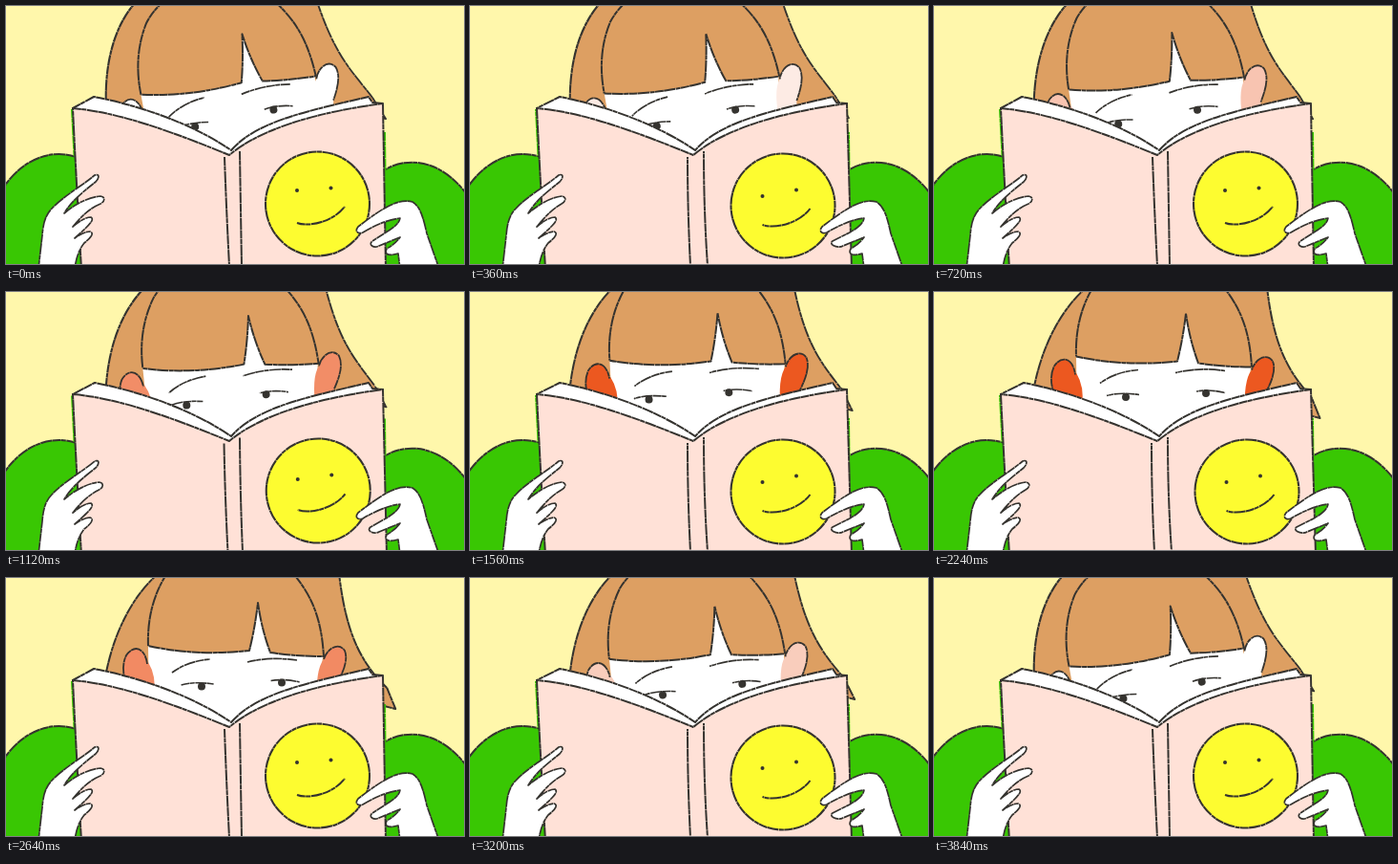
These frames come from a looping animation (480 px wide and 270 px high, 3880 ms). An HTML page with a canvas:

```html
<!DOCTYPE html>
<html lang="en">
<head>
<meta charset="utf-8">
<title>Reading</title>
<style>
html, body { margin: 0; width: 100%; height: 100%; overflow: hidden; background: #fff7ab; }
canvas { display: block; width: 480px; height: 270px; }
</style>
</head>
<body>
<canvas id="stage" width="480" height="270"></canvas>
<script>
const ctx = document.getElementById('stage').getContext('2d');
const LOOP = 3880;
const INK = '#35332f', PAPER = '#fff7ab', HAIR = '#dd9f62', GREEN = '#39c703', PINK = '#ffe1d7';

// Pose keys, interpolated smoothly around the loop
const times = [0, 720, 1560, 2240, 2640, 3200];
const keys = {
  x: [233, 233, 238.5, 241, 241, 238],
  y: [82.5, 80.5, 73, 72.5, 76, 81.5],
  angle: [-.165, -.13, -.04, 0, 0, -.09],
  shear: [-22, -17, -9, 0, 0, -9],
  tail: [118, 118, 124, 132, 137, 127],
  gaze: [-1.5, -5, -12.5, 0, 4, .5],
  blush: [0, .35, 1, 1, .7, .3]
};

function sample(values, t) {
  const n = times.length;
  const wrap = i => (i + n) % n;
  const timeAt = i => times[wrap(i)] + Math.floor(i / n) * LOOP;
  const slope = i => (values[wrap(i + 1)] - values[wrap(i - 1)]) / (timeAt(i + 1) - timeAt(i - 1));
  let i = n - 1;
  while (times[i] > t) i--;
  const span = timeAt(i + 1) - times[i], u = (t - times[i]) / span;
  const a = values[i], b = values[wrap(i + 1)];
  return a + (b - a) * u * u * (3 - 2 * u)
    + span * u * (1 - u) * (slope(i) * (1 - u) - slope(wrap(i + 1)) * u);
}

const fill = (path, color) => { ctx.fillStyle = color; ctx.fill(new Path2D(path)); };

function line(path, width = 2, color = INK) {
  ctx.lineWidth = width;
  ctx.strokeStyle = color;
  ctx.stroke(new Path2D(path));
}

function shape(path, color, width) { fill(path, color); line(path, width); }

function dot(x, y, r, color = INK) {
  ctx.fillStyle = color;
  ctx.beginPath();
  ctx.arc(x, y, r, 0, Math.PI * 2);
  ctx.fill();
}

function sleeves() {
  shape('M-5 194C10 168 40 147 74 158L80 275H-5Z', GREEN);
  shape('M392 175C415 157 455 157 485 200V275H392Z', GREEN);
}

function hair(pose) {
  const ty = pose.tail, tx = 394 + (ty - 118) * .75;
  const left = 'M160 -5C131 20 112 60 104 104';
  const right = `${tx - 9} ${ty - 22}C370 ${ty - 50} 356 55 349 -5`;
  const tip = `L${tx} ${ty}L${tx - 12} ${ty - 3}`;
  ctx.save();
  ctx.transform(1, 0, -pose.shear / 100, 1, pose.shear, 0);
  fill(`${left}V140H385L${tx - 12} ${ty - 3}L${tx} ${ty}L${right}Z`, HAIR);
  line(left);
  line('M' + right);
  line(`M${tx - 9} ${ty - 22}${tip}`);
  ctx.restore();
}

function head(pose) {
  const mix = to => 255 + (to - 255) * pose.blush;
  const earColor = `rgb(${mix(236)},${mix(88)},${mix(32)})`;
  const leftEar = 'M148 86C146 69 134 65 126 77C121 87 122 101 130 115';
  const rightEar = 'M333 81C337 69 349 63 355 72C359 82 353 95 347 106';
  const gaze = pose.gaze, lid = gaze * .65;

  ctx.save();
  ctx.translate(pose.x, pose.y);
  ctx.rotate(pose.angle);
  ctx.translate(-241, -72);

  fill('M149 66L250 68L264 20L278 68L333 70L326 130L300 180H200L150 130Z', '#fff');
  fill(leftEar + 'L155 118Q158 99 149 84Z', earColor);
  fill(rightEar + 'L344 128H326Q324 92 333 81Z', earColor);
  line(leftEar, 1.8);
  line(rightEar, 1.8);

  const leftArc = 'M149 67C148 40 154 15 167 -6Q176 -18 190 -26';
  const rest = '304 -5C324 20 331 45 333 78Q305 78 277 74Q268 50 264 22Q261 48 255 72Q200 78 149 67';
  fill(`${leftArc}L${rest}Z`, HAIR);
  line(leftArc);
  line('M' + rest);

  line('M174 95Q190 83 214 81', 1.7);
  line('M253 84Q278 78 305 82', 1.7);
  dot(201 + gaze, 109.5, 4);
  dot(285 + gaze, 105.5, 4);
  line(`M${181 + lid} 108Q${195 + lid} 104 ${215 + lid} 107`, 1.6);
  line(`M${275 + lid} 103.5Q${289 + lid} 101 ${305 + lid} 105`, 1.6);
  ctx.restore();
}

function book(b) {
  line('M69.5 108L72 157', 3, GREEN);
  line('M396.5 132L397 174', 3, GREEN);
  shape(`M70 107L${92 + b * 2} 95C140 104 195 123 236 151C262 121 315 110 380 95L384 101L395 102L243 165Z`, '#fff');
  shape(`M70 107C120 111 180 134 234 156C265 130 320 112 395 102L${398 + b * 2} 275H79Q74 190 70 107Z`, PINK);
  line(`M${229 - b} 158Q${231 - b * 3} 215 ${234 - b * 3} 272`);
  line(`M245 152Q${246 - b} 215 ${247 + b * 2} 272`);
}

function smiley(b) {
  ctx.save();
  ctx.translate(b * 1.5, b * 2);
  dot(326.5, 207, 54.5, '#fdfc30');
  line('M381 207A54.5 54.5 0 1 1 272 207A54.5 54.5 0 1 1 381 207', 2.1);
  dot(305, 193 + b * 4, 2);
  dot(340.5, 190.5, 2);
  line('M305 227C318 232 344 225 355 210', 2);
  ctx.restore();
}

function hands(b) {
  const reach = 103 - b * 3;
  shape(`M34 275L38 240C39 226 42 218 48 212C60 199 80 188 93 177C98 175 98 180 94 184
    C84 192 69 203 61 217Q80 201 ${reach - 4} 199C${reach + 2} 200 ${reach} 205 ${reach - 4} 207
    C87 212 78 221 70 231Q82 221 89 221C94 224 84 232 72 243Q82 236 88 236
    C94 238 86 245 82 248Q74 258 72 275Z`, '#fff', 1.7);
  shape(`M454 275L441 238C437 220 434 210 426 205C410 201 394 212 369 231
    C365 236 369 239 374 237Q396 224 413 222Q412 229 398 237L${384 - b * 4} 246
    C${379 - b * 4} 250 386 254 391 251L413 242Q408 249 399 254C396 260 401 262 411 259L413 275Z`, '#fff', 1.7);
}

function draw(t) {
  const pose = {};
  for (const name in keys) pose[name] = sample(keys[name], t);
  pose.blush = Math.min(1, Math.max(0, pose.blush));

  // Three line drawings cycle, 80 ms each
  const drawing = Math.floor(t / 80) % 3;
  const boil = [0, 1, .5][drawing];
  ctx.setLineDash([9, .4, 5, .6, 12, .4]);
  ctx.lineDashOffset = drawing * 7;

  ctx.fillStyle = PAPER;
  ctx.fillRect(0, 0, 480, 270);
  sleeves();
  hair(pose);
  head(pose);
  book(boil);
  smiley(boil);
  hands(boil);
}

function tick() {
  draw(performance.now() % LOOP);
  requestAnimationFrame(tick);
}
ctx.lineJoin = 'round';
tick();
</script>
</body>
</html>
```
